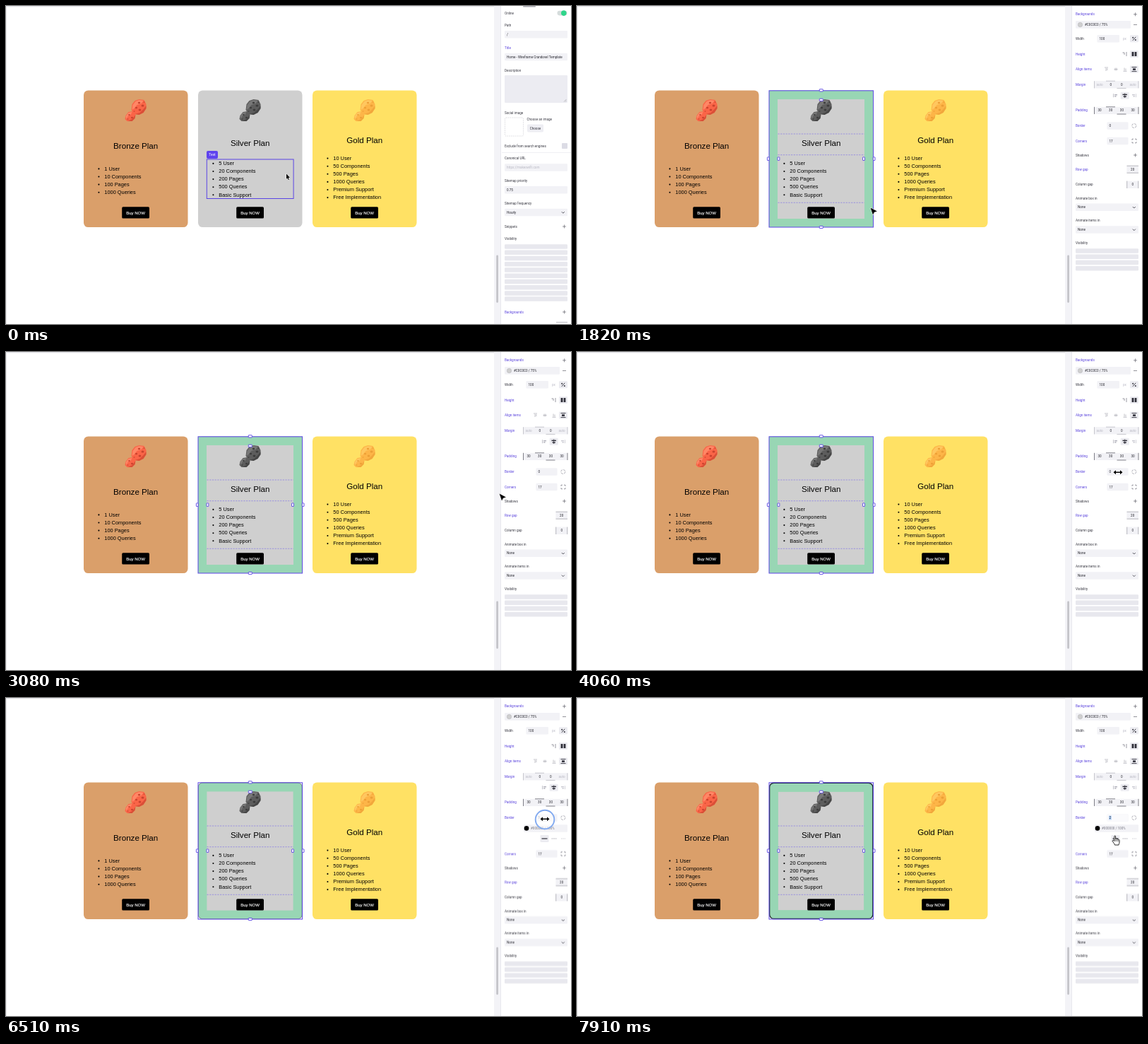
Animation, 800 px wide and 450 px high, one loop 8 s. Source, as an HTML page:

```html
<!DOCTYPE html>
<html lang="en">
<head>
<meta charset="utf-8">
<title>Plan editor</title>
<style>
html, body { margin: 0; width: 100%; height: 100%; overflow: hidden; background: #fff; }
svg { display: block; width: 800px; height: 450px; }
text { font: 4.6px Roboto, sans-serif; fill: #373741; }
text.p { fill: #5841dc; }
text.l { fill: #b8b8c3; }
text.g { fill: #777783; }
text.v { fill: #24242c; }
text.tag { fill: #fff; font-size: 5px; }
.card text { font: 7.4px "Liberation Sans", Arial, sans-serif; fill: #000; }
.card .title { font-size: 11.6px; }
.card .buy { font-size: 6.05px; fill: #fff; stroke: #fff; stroke-width: .12; }
.mid { text-anchor: middle; }

/* 1% = 80 ms */
.a { animation: 8s step-end infinite; }
.textHover { animation-name: textHover; }
.boxHover { animation-name: boxHover; }
.before { animation-name: before; }
.after { animation-name: after; }
.b0 { animation-name: b0; }
.b1 { animation-name: b1; }
.b2 { animation-name: b2; }
.bordered { animation-name: bordered; }
.lower { animation-name: lower; }
.press { animation-name: press; }
.marked { animation-name: marked; }
.wide { animation-name: wide; }
.resize { animation-name: resize; }
.hand { animation-name: hand; }
.cursor { animation: move 8s ease-in-out infinite; }
@keyframes textHover { 0% { opacity: 1 } 7%, 100% { opacity: 0 } }
@keyframes boxHover { 0% { opacity: 0 } 7% { opacity: 1 } 22.5%, 100% { opacity: 0 } }
@keyframes before { 0% { opacity: 1 } 22.5%, 100% { opacity: 0 } }
@keyframes after { 0% { opacity: 0 } 22.5%, 100% { opacity: 1 } }
@keyframes b0 { 0% { opacity: 1 } 70%, 100% { opacity: 0 } }
@keyframes b1 { 0% { opacity: 0 } 70% { opacity: 1 } 84%, 100% { opacity: 0 } }
@keyframes b2 { 0% { opacity: 0 } 84%, 100% { opacity: 1 } }
@keyframes bordered { 0% { opacity: 0 } 70%, 100% { opacity: 1 } }
@keyframes lower { 0% { transform: none } 70%, 100% { transform: translateY(29.5px) } }
@keyframes press { 0% { opacity: 0 } 65% { opacity: 1 } 86.5%, 100% { opacity: 0 } }
@keyframes marked { 0% { opacity: 0 } 86.5%, 100% { opacity: 1 } }
@keyframes wide { 0% { opacity: 0 } 7% { opacity: 1 } 41%, 100% { opacity: 0 } }
@keyframes resize { 0% { opacity: 0 } 41% { opacity: 1 } 92.5%, 100% { opacity: 0 } }
@keyframes hand { 0% { opacity: 0 } 92.5%, 100% { opacity: 1 } }
@keyframes move {
  0%, 1% { transform: translate(397px, 238px) }
  10%, 15% { transform: translate(414px, 288px) }
  21%, 22.5% { transform: translate(416px, 286px) }
  28%, 31% { transform: translate(424px, 280px) }
  42% { transform: translate(772px, 180px) }
  47%, 53% { transform: translate(766px, 170px) }
  60%, 68.3% { transform: translate(760px, 170px) }
  81.4%, 90% { transform: translate(763px, 171px) }
  96%, 100% { transform: translate(763px, 201px) }
}
</style>
</head>
<body>
<svg id="stage" viewBox="0 0 800 450"></svg>
<script>
const rect = (x, y, w, h, fill, r = 0, more = '') =>
  `<rect x="${x}" y="${y}" width="${w}" height="${h}" fill="${fill}" rx="${r}" ${more}/>`;
const path = (d, stroke, w = .7, more = '') =>
  `<path d="${d}" fill="none" stroke="${stroke}" stroke-width="${w}" ${more}/>`;
const shape = (d, fill, more = '') => `<path d="${d}" fill="${fill}" ${more}/>`;
const text = (x, y, s, cls = '', size = 4.6) =>
  `<text x="${x}" y="${y + size * .36}" class="${cls}">${s}</text>`;
const group = (cls, ...parts) => `<g class="${cls}">${parts.join('')}</g>`;
const anim = (name, ...parts) => group('a ' + name, ...parts);
const at = (x, y, s) => `<g transform="translate(${x} ${y})">${s}</g>`;
const purple = '#5b45e4', soft = '#f2f2f6', dark = '#30303a', pale = '#c3c3cc';

const field = (y, s, cls = 'v', x = 706, w = 89) =>
  rect(x, y - 5.2, w, 10.4, soft, 1.2) + text(x + 3, y, s, cls);
const plus = y => path(`M788 ${y}h5M790.5 ${y - 2.5}v5`, '#4a4a55', .6);
const select = (y, s) => field(y, s) + path(`M786.8 ${y - .8}l2 2 2-2`, dark, .8);
const bars = (y, n) => Array.from({ length: n }, (_, i) =>
  rect(706, y + i * 8.23, 89, 6.5, '#e8e8ee', 1.2)).join('');

/* Plan cards */
const rock = ([base, light, deep]) => [
  shape('M10 7L14 2 20 0 27 1 30 7 30 13 26 19 20 22 13 21 9 15z', base),
  shape('M11 8L15 3 20 1 26 2 23 6 17 8 13 13 10 15z', light),
  shape('M30 9L30 13 26 19 20 22 14 21 21 19 26 14z', deep, 'opacity=".65"'),
  shape('M1 23L5 18 11 17 15 21 14 27 10 31 3 31 0 28z', base),
  shape('M1 24L5 19 10 18 8 22 4 24 2 28z', light),
  shape('M15 22L14 27 10 31 4 31 10 28z', deep, 'opacity=".65"'),
  ...[[20, 5, 1.7], [25, 9, 2], [16, 12, 1.6], [21, 15, 1.9], [13, 17, 1], [27, 4, 1], [6, 22, 1.3], [10, 26, 1.5], [4, 28, 1]]
    .map(([x, y, r]) => `<ellipse cx="${x}" cy="${y}" rx="${r}" ry="${r * .8}" fill="${deep}"/>`)
].join('');

const cardBack = (x, fill) => rect(x, 119.5, 147.5, 193.5, fill, 6.3);
const cardBody = (x, name, titleY, listY, items, colors) => group('card',
  at(x + 58.5, 132, rock(colors)),
  text(x + 73.7, titleY, name, 'title mid', 11.6),
  ...items.map((s, i) => {
    const y = listY + i * 11.1;
    return `<circle cx="${x + 21.4}" cy="${y + .4}" r="1.05"/>` + text(x + 29.3, y, s, '', 7.4);
  }),
  rect(x + 54.2, 284.3, 38.8, 16.3, '#000', 1.6),
  text(x + 73.6, 292.5, 'Buy NOW', 'buy mid', 6.05));

/* Padding overlay, inset by the card border */
const padding = (inset, color, r) => {
  const edge = 272 + inset, top = 119.7 + inset;
  return rect(edge, top, 147.6 - 2 * inset, 193.2 - 2 * inset, color, r) +
    rect(284 + inset, 132 + inset, 123 - 2 * inset, 169 - 2 * inset, '#cfcfcf');
};
const ring = (w, color) => rect(272 + w / 2, 119.6 + w / 2, 147.5 - w, 193.4 - w, 'none', 6,
  `stroke="${color}" stroke-width="${w}"`);
const frame = (x, y, w, h) => rect(x, y, w, h, 'none', 0, `stroke="${purple}" stroke-width="1"`);
const handle = (x, y, w, h) => rect(x - w / 2, y - h / 2, w, h, '#fff', .4, `stroke="${purple}" stroke-width=".9"`);
const tag = (x, y, w, s) => rect(x, y, w, 11, '#5f43ee', 2) + text(x + w / 2, y + 5.6, s, 'tag mid', 5);

const silver = [
  cardBack(272, '#cfcfcf'),
  anim('boxHover', padding(0, '#c0d2c5', 0)),
  anim('after',
    anim('b0', padding(0, '#98d6b4', 0)),
    anim('b1', padding(.4, '#98d6b4', 6), ring(.6, '#4c5b5a')),
    anim('b2', padding(.9, '#98d6b4', 6), ring(1.3, '#1c2a30'))),
  cardBody(272, 'Silver Plan', 194, 222.5,
    ['5 User', '20 Components', '200 Pages', '500 Queries', 'Basic Support'], ['#5d5d5d', '#777', '#3b3b3b']),
  anim('textHover', frame(284.3, 217, 122.8, 55.5), tag(284, 205, 16, 'Text')),
  anim('boxHover', frame(272, 119.8, 147.6, 193.2), tag(272, 107.6, 15, 'Box')),
  anim('after',
    frame(272, 119.8, 147.6, 193.2),
    path('M284.5 181H407M284.5 210.7H407M284.5 278.3H407', '#8577e6', .7, 'stroke-dasharray="2.2 1.5"'),
    ...[119.3, 132.8, 313].map(y => handle(345.8, y, 5, 3.2)),
    ...[270.8, 285.4, 406, 420.6].map(x => handle(x, 216.2, 2.8, 4.6)))
].join('');

/* Page settings */
const pagePanel = anim('before',
  rect(732, 0, 18, 1.6, '#a9a9b0', .8),
  text(706, 10, 'Online'),
  rect(780.5, 6.8, 14, 6.6, '#d5dcdc', 3.3), '<circle cx="789.8" cy="10.1" r="3.8" fill="#2fd68b"/>',
  text(706, 27.5, 'Path'), field(40.3, '/'),
  text(706, 59.3, 'Title', 'p'), field(72, 'Home - Wireframe Crandovel Template'),
  text(706, 91.2, 'Description'), rect(706, 98, 89, 39, '#ececf2', 1.2),
  path('M790 135.5l3.5-3.5M792 135.5l1.5-1.5', '#888', .5),
  text(706, 151, 'Social image'),
  rect(706.5, 158, 26, 26, '#fff', 1.5, `stroke="${pale}" stroke-width=".6" stroke-dasharray="1.5 1.2"`),
  text(737.5, 160.5, 'Choose an image'), rect(738, 167.5, 23, 11, '#eeeef3', 1.4), text(749.5, 173, 'Choose', 'mid'),
  text(706, 198, 'Exclude from search engines'), rect(787, 194, 8, 8, '#dcdce5', 1),
  rect(702, 207, 98, .7, '#e9e9ef'),
  text(706, 215.5, 'Canonical URL'), field(228.5, 'https://makeswift.com', 'l'),
  text(706, 247.3, 'Sitemap priority'), field(260.2, '0.75'),
  text(706, 279.2, 'Sitemap frequency'), select(292, 'Hourly'),
  text(706, 312, 'Snippets'), plus(312),
  text(706, 329.2, 'Visibility'), bars(337.3, 10),
  text(706, 433, 'Backgrounds', 'p'), plus(433),
  rect(779, 447, 16, 1, '#b9b9c0'));

/* Box settings */
const cells = (y, values, color) => rect(732.5, y - 5, 62.5, 10.2, soft) +
  values.map((s, i) => text(740 + i * 15.7, y, s, 'mid ' + (s === 'auto' ? 'l' : 'v'))).join('') +
  path(`M732.5 ${y - 5}v10.2M795 ${y - 5}v10.2M749 ${y - 5}h13M764.5 ${y + 5.2}h13`, color, .8);
const alignIcon = (x, y, color) => path(`M${x - 3} ${y - 2.5}v5`, color, .7) + rect(x - 1.5, y - 1.6, 4, 1.2, color) + rect(x - 1.5, y + .6, 2.6, 1.2, color);
const centered = (x, y) => path(`M${x - 3.5} ${y - 3}h7M${x - 3.5} ${y + 3}h7`, dark, .9) + rect(x - 2, y - 1.3, 4, 2.6, dark);
const active = (x, y) => rect(x - 6, y - 5, 12, 10, '#ececf1', 1);

const boxPanel = anim('after',
  text(706, 11.8, 'Backgrounds', 'p'), plus(11.8),
  rect(706, 21, 78, 10.8, soft, 1.2),
  '<circle cx="712.5" cy="26.5" r="3.2" fill="#cfcfcf" stroke="#b2b2b8" stroke-width=".5"/>',
  text(719, 26.5, '#C0C0C0 / 75%', 'v'), path('M788 26.5h5', '#4a4a55', .6),
  text(706, 46.3, 'Width'), field(46.3, '100', 'v', 736.5, 31.5),
  text(775.5, 46.3, 'px', 'l mid'), active(789, 46.3),
  path('M791.2 43.8l-4.4 5', dark, .9), '<circle cx="787.2" cy="44.8" r="1" fill="#30303a"/><circle cx="790.8" cy="47.9" r="1" fill="#30303a"/>',
  text(706, 68, 'Height', 'p'),
  path('M772.5 66h2.5v3M778 65v6', '#8d8d97', .9), active(789, 68),
  rect(785.6, 65, 2.8, 6, dark), rect(789.6, 65, 2.8, 6, dark),
  text(706, 89.6, 'Align items', 'p'),
  path('M747 87h5M749 88v4M750.8 88v3M760.5 89.6h5M762 87.5v4M764 87.5v4M773.5 92.3h5M775 87.5v4M777 88.5v3', '#a9a9b4', .7),
  active(789, 89.6), centered(789, 89.6),
  text(706, 111.2, 'Margin', 'p'), cells(111.2, ['auto', '0', '0', 'auto'], '#b9b9c2'),
  alignIcon(762.5, 126.7, '#a5a5b0'), active(775.7, 126.7),
  path('M775.7 123.5v6.5', dark, .8), rect(772.5, 124.6, 6.4, 1.5, dark), rect(773.6, 127.4, 4.2, 1.5, dark),
  `<g transform="matrix(-1 0 0 1 1577 0)">${alignIcon(788.5, 126.7, '#c1c1ca')}</g>`,
  text(706, 147.8, 'Padding', 'p'), cells(147.8, ['30', '30', '30', '30'], '#60606b'),
  text(706, 169.5, 'Border', 'p'), rect(750.5, 164.3, 30, 10.4, soft, 1.2),
  anim('marked', rect(750.5, 164.3, 30, 10.4, '#fafafc', 1.2), rect(753, 166.6, 3.8, 5.8, '#b3d3fb')),
  anim('b0', text(753.5, 169.5, '0', 'v')),
  anim('b1', text(753.5, 169.5, '1', 'v')),
  anim('b2', text(753.5, 169.5, '2', 'v')),
  '<circle cx="788.8" cy="169.5" r="3" fill="none" stroke="#91919b" stroke-width=".7" stroke-dasharray="3.4 1.3"/>',
  anim('bordered',
    rect(733, 179.3, 62, 10.4, soft, 1.2),
    '<circle cx="737" cy="184.4" r="3.3"/>', text(743, 184.4, '#000000 / 100%', 'g'),
    active(762.5, 199), rect(758.5, 198.4, 8, 1.2, dark),
    path('M772.5 199h7', '#9d9da7', .8, 'stroke-dasharray="1.8 .8"'),
    path('M786 199h6', '#b2b2bb', .8, 'stroke-dasharray=".8 .9"')),
  anim('lower',
    text(706, 191, 'Corners', 'p'), field(191, '17', 'v', 750.5, 30),
    path('M786 190v-1.8h2M790 188.2h2V190M792 192v1.8h-2M788 193.8h-2V192', '#777782', .7),
    text(706, 211, 'Shadows'), plus(211),
    text(706, 231.2, 'Row gap', 'p'), rect(778.5, 226, 16.5, 10.4, soft), text(786.7, 231.2, '20', 'v mid'),
    path('M778.5 226.2h16.5M778.5 236.2h16.5', '#8b8b96', .6),
    text(706, 252.8, 'Column gap'), rect(778.5, 247.6, 16.5, 10.4, soft), text(786.7, 252.8, '0', 'v mid'),
    path('M778.7 247.6v10.4M794.8 247.6v10.4', '#8b8b96', .6),
    text(706, 272, 'Animate box in'), select(284.8, 'None'),
    text(706, 303.7, 'Animate items in'), select(316.5, 'None'),
    text(706, 335.5, 'Visibility'), bars(343.3, 4)));

const outline = 'stroke="#fff" stroke-width="1" stroke-linejoin="round" paint-order="stroke"';
const cursor = group('cursor',
  anim('press', '<circle cx="0" cy="1" r="13.3" fill="#fff" fill-opacity=".55" stroke="#82aaf0" stroke-width="1.9"/>'),
  anim('textHover', shape('M0-.5V6.8L1.6 5.4 2.7 8 3.9 7.5 2.8 5H5z', '#000', outline)),
  anim('wide', shape('M-.5-.5L3 9.6 4.8 5.8 8.8 4.6z', '#000', outline)),
  anim('resize', shape('M-6.5 .3L-3-2.7V-.5H3V-2.7L6.5 .3 3 3.3V1.1H-3V3.3z', '#000', outline)),
  anim('hand', shape('M-2.2 1.5V-5C-2.2-6.3-.4-6.3-.4-5V-1.6C.2-2.4 1.3-2.2 1.5-1.3 2.2-1.9 3.1-1.5 3.3-.7 4.1-1.1 5-.6 5 .3V3C5 5 4 5.6 4 7H-1.6C-1.8 5.3-3.6 3.6-4.7 1.7-5.3.5-3.7-.2-3 .7z', '#fff', 'stroke="#111" stroke-width=".9"'),
    path('M-.4-1.6V2M1.5-1.3V2M3.3-.7V2.2', '#111', .6)));

document.getElementById('stage').innerHTML = [
  rect(0, 0, 800, 450, '#fff'),
  rect(0, 0, 691, 1.3, '#e3e3e8'), rect(0, 0, .8, 450, '#e9e9ed'),
  cardBack(110, '#da9f6a'),
  cardBody(110, 'Bronze Plan', 197.5, 230, ['1 User', '10 Components', '100 Pages', '1000 Queries'], ['#fa6548', '#ff8766', '#c9432e']),
  silver,
  cardBack(434, '#ffe164'),
  cardBody(434, 'Gold Plan', 190, 215.2,
    ['10 User', '50 Components', '500 Pages', '1000 Queries', 'Premium Support', 'Free Implementation'], ['#fdb548', '#ffc75f', '#ec9f35']),
  rect(691, 0, 10, 450, '#f3f3f7'), rect(700.3, 0, .7, 450, '#e4e4ea'),
  rect(694.2, 352.5, 2.8, 67.5, '#c5c5ca', 1.4),
  pagePanel, boxPanel, cursor
].join('');
</script>
</body>
</html>
```
